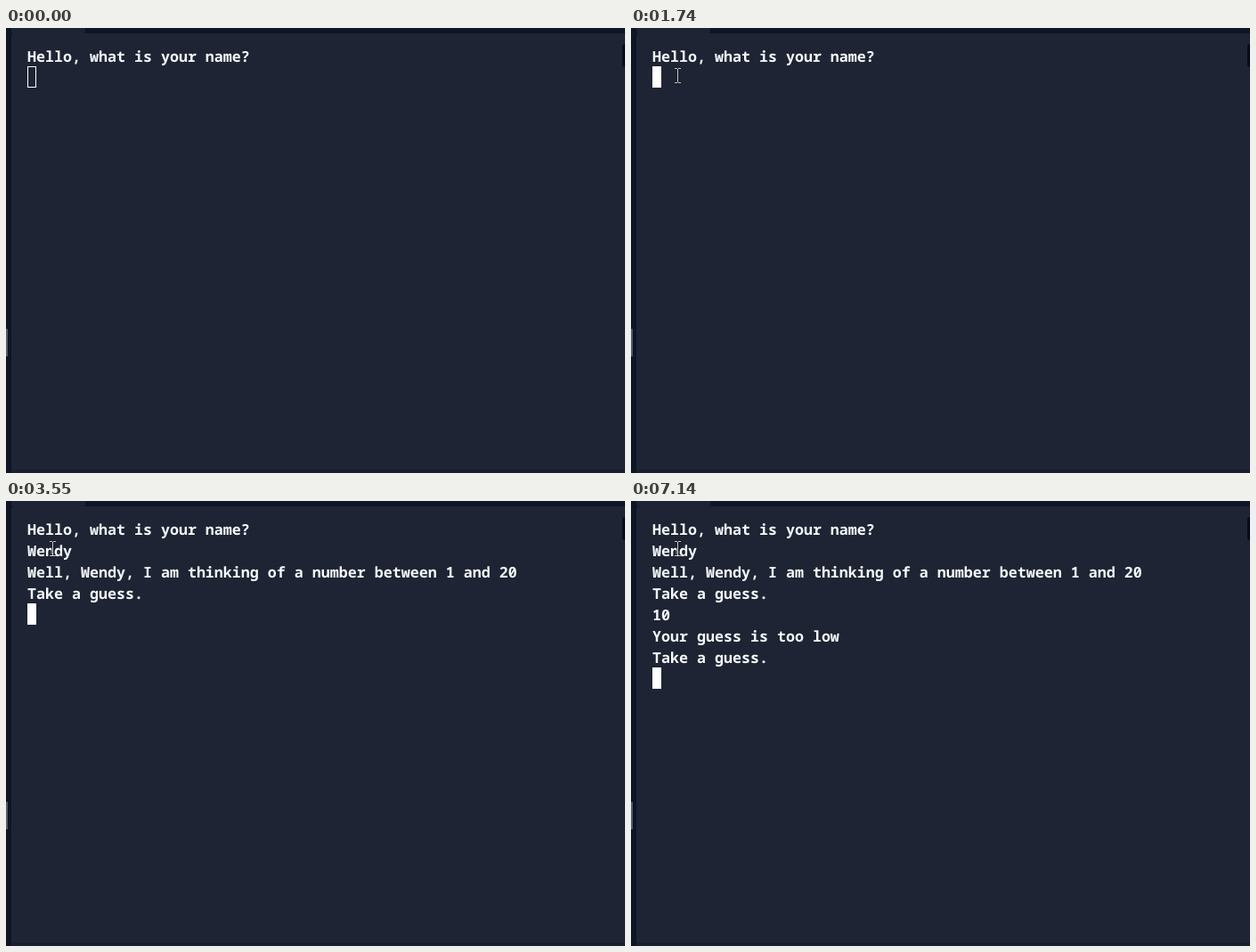
An HTML page for the animation above (8000 ms loop, 695 by 500 pixels).

```html
<!DOCTYPE html>
<html lang="en">
<head>
<meta charset="utf-8">
<title>Guessing game console</title>
<style>
  html, body { margin: 0; width: 100%; height: 100%; overflow: hidden; background: #0e1525; }
  #stage { position: relative; width: 695px; height: 500px; overflow: hidden; background: #0e1525; }
  #stage > * { position: absolute; }
  #tab { left: 6px; top: 0; width: 83px; height: 6px; background: #1c2333; border-radius: 0 0 2px 2px; }
  #panel { left: 6px; top: 6px; width: 689px; height: 490px; background: #1e2433; border-radius: 4px 0 0 0; }
  #foot { left: 6px; top: 496px; width: 689px; height: 4px; background: #181f2e; }
  #handle { left: 0; top: 338px; width: 2px; height: 31px; background: #555b69; }
  #thumb { left: 692px; top: 18px; width: 3px; height: 26px; background: #080c16; border-radius: 3px 0 0 3px; }
  #text {
    left: 24px; top: 20px; margin: 0; color: #f5f9fc;
    font: 600 16.6667px/24px "Noto Sans Mono", "Liberation Mono", monospace;
    text-rendering: geometricPrecision; font-variant-ligatures: none;
  }
  #caret { left: 24px; top: 19px; width: 10px; height: 24px; box-sizing: border-box; border: 1px solid #fff; }
  #caret.on { background: #fff; }
  #mouse { left: -5px; top: -9px; }
</style>
</head>
<body>
<div id="stage">
  <div id="tab"></div>
  <div id="panel"></div>
  <div id="foot"></div>
  <div id="handle"></div>
  <div id="thumb"></div>
  <pre id="text"></pre>
  <div id="caret"></div>
  <svg id="mouse" width="11" height="19" fill="none">
    <path d="M2 1.5h3M6 1.5h3M5.5 2v15M2 17.5h3M6 17.5h3" stroke="#151a26" stroke-width="2.4"/>
    <path d="M2 1.5h3M6 1.5h3M5.5 2v15M2 17.5h3M6 17.5h3" stroke="#c9cbc6"/>
  </svg>
</div>
<script>
const LOOP = 8000, FOCUS = 1470;
const MOVE_START = 460, MOVE_STEPS = 12, STEP = (1270 - MOVE_START) / MOVE_STEPS;
const name = "Wendy";
const ask = "Take a guess.\n";

// [time, text added to the console]
const output = [
  [0, "Hello, what is your name?\n"],
  ...[2200, 2680, 2950, 3150, 3220].map((t, i) => [t, name[i]]),
  [3550, `\nWell, ${name}, I am thinking of a number between 1 and 20\n${ask}`],
  [5480, "1"],
  [6810, "0"],
  [7140, `\nYour guess is too low\n${ask}`]
];

// [step, x, y] along the pointer's path
const path = [[0, 516, 446], [3, 300, 280], [5, 210, 163], [9, 39, 37], [11, 48, 55], [12, 52, 53]];

const [text, caret, mouse] = ["text", "caret", "mouse"].map(id => document.getElementById(id));

function pointAt(step) {
  const i = Math.max(1, path.findIndex(p => p[0] >= step));
  const [a, b] = [path[i - 1], path[i]];
  const k = (step - a[0]) / (b[0] - a[0]);
  return [1, 2].map(n => Math.round(a[n] + (b[n] - a[n]) * k));
}

function draw(t) {
  const shown = output.filter(([at]) => t >= at).map(([, s]) => s).join("");
  if (text.textContent !== shown) text.textContent = shown;

  const lines = shown.split("\n");
  const x = lines[lines.length - 1].length * 10, y = (lines.length - 1) * 24;
  caret.style.transform = `translate(${x}px, ${y}px)`;
  caret.classList.toggle("on", t >= FOCUS);

  const step = Math.min(MOVE_STEPS, Math.floor((t - MOVE_START) / STEP + 1e-6));
  mouse.style.visibility = step < 0 ? "hidden" : "visible";
  if (step >= 0) {
    const [mx, my] = pointAt(step);
    mouse.style.transform = `translate(${mx}px, ${my}px)`;
  }
}

const start = performance.now();
function tick() {
  draw((performance.now() - start) % LOOP);
  requestAnimationFrame(tick);
}
tick();
</script>
</body>
</html>
```
